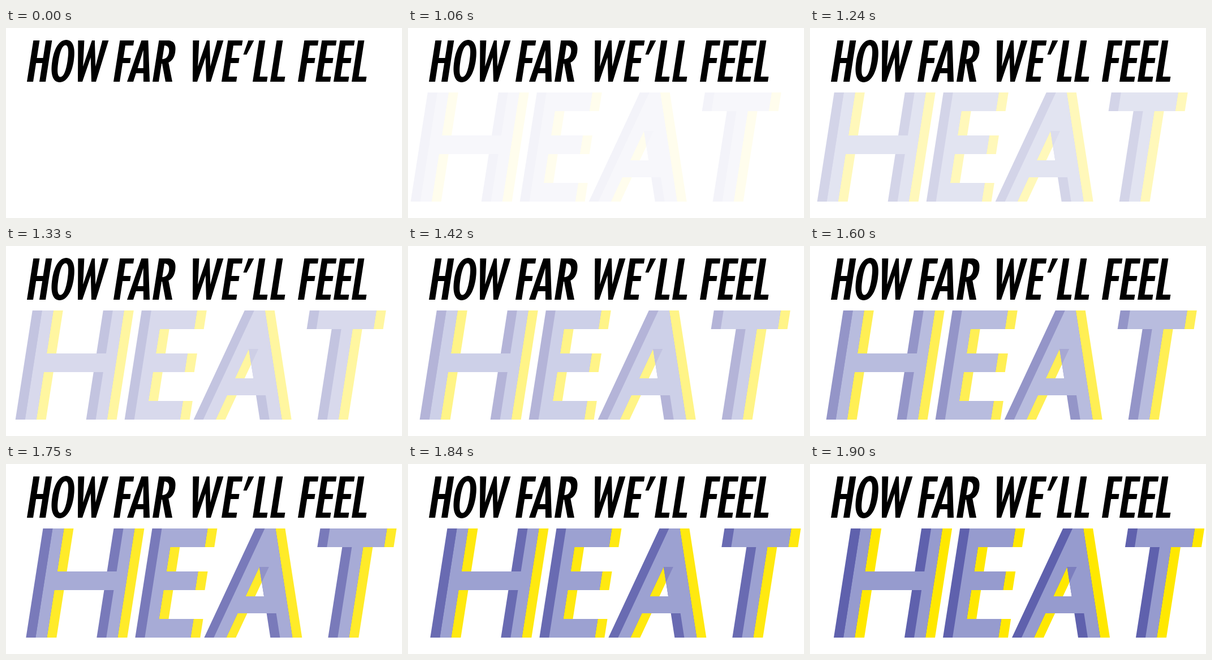
Recreate the animation shown at these times as an HTML page. Size 700 px wide and 336 px high, loop 2900 ms.

```html
<!DOCTYPE html>
<html lang="en">
<head>
<meta charset="utf-8">
<title>How far we’ll feel heat</title>
<style>
  html, body { margin: 0; width: 100%; height: 100%; overflow: hidden; background: #fff; }
  svg { display: block; width: 100%; height: 100%; }
</style>
</head>
<body>
<svg id="stage" viewBox="0 0 700 336" role="img" aria-label="HOW FAR WE’LL FEEL HEAT"></svg>
<script>
const LOOP = 2900, START = 1060, STEP = 30, STEPS = 30;
const SLANT = 0.156, DEPTH = 17, TRAVEL = 40;

// Upright condensed capitals, 73 units high
const small = {
  H: 'M0 0h11v31h11v-31h11v73h-11v-33h-11v33h-11z',
  O: 'M19-1C31-1 38 13 38 36.5S31 74 19 74 0 60 0 36.5 7-1 19-1z' +
     'M19 8.5C13.5 8.5 11 19 11 36.5S13.5 64.5 19 64.5 27 54 27 36.5 24.5 8.5 19 8.5z',
  W: 'M0 0H11L16 46 24.5 0H29.5L38 46 43 0H54L43 73H35L27 30 19 73H11z',
  F: 'M0 0h25v9h-14v22h13v9h-13v33h-11z',
  A: 'M14 0h12l14 73h-11l-2.5-15h-13l-2.5 15h-11zM20 17l-5 32h10z',
  R: 'M0 0h15c12 0 17 8 17 21 0 10-4 16-9 18l12 34h-12l-11-32h-1v32h-11z' +
     'M11 9v24c7 0 10-5 10-12s-3-12-10-12z',
  E: 'M0 0h26v9h-15v22h14v9h-14v24h15v9h-26z',
  L: 'M0 0h11v64h14v9h-25z',
  '’': 'M6 0h10l-9 25h-6z'
};

// Wide capitals, 193 units high
const big = {
  H: 'M0 0h37v76h88v-76h37v193h-37v-84h-88v84h-37z',
  E: 'M0 0h98v33h-61v43h56v33h-56v51h61v33h-98z',
  A: 'M0 193L60 0H96L156 193H117L103.6 150H52.4L39 193zM61.7 120H94.3L78 68z',
  T: 'M0 0h118v33h-37v160h-37v-160h-44z'
};
const fold = 'M78 68h17l-8.5 27.3z';   // where the legs of the A cross

const line = 'HOWFARWE’LLFEEL';
const lineX = [37, 76, 116, 190, 214, 259, 319, 381, 411, 436, 467, 516, 547, 579, 611];
const word = 'HEAT';
const wordX = [42, 235, 357, 532];

const place = (d, x) => `<path d="${d}" transform="translate(${x} 0)"/>`;
const letters = (text, xs, font) => [...text].map((c, i) => place(font[c], xs[i])).join('');
const lean = (x, y, h) => `matrix(1 0 ${-SLANT} 1 ${x + SLANT * h} ${y})`;

const caps = letters(word, wordX, big);
const shifted = letters(word, wordX.map(x => x + DEPTH), big);

const stage = document.getElementById('stage');
stage.innerHTML = `
  <defs><clipPath id="overlap" clip-rule="evenodd">${shifted}</clipPath></defs>
  <g fill-rule="evenodd" transform="${lean(0, 22, 73)}">${letters(line, lineX, small)}</g>
  <g id="word" fill-rule="evenodd" clip-rule="evenodd">
    <g fill="#ffe800">${shifted}</g>
    <g fill="#5f61ad">${caps}</g>
    <g fill="#969bce" clip-path="url(#overlap)">${caps}</g>
    <g fill="#7c7ebe">${place(fold, wordX[word.indexOf('A')])}</g>
  </g>`;
const wordGroup = document.getElementById('word');

// The word fades in while sliding right, both at a steady rate
function draw(time) {
  const t = time % LOOP;
  const step = Math.floor((t - START) / STEP) + 2;
  const p = t < START ? 0 : Math.min(1, step / STEPS);
  wordGroup.setAttribute('opacity', p);
  wordGroup.setAttribute('transform', lean(-TRAVEL * (1 - p), 114, 193));
}

const origin = performance.now();
function tick() {
  draw(performance.now() - origin);
  requestAnimationFrame(tick);
}
tick();
</script>
</body>
</html>
```
